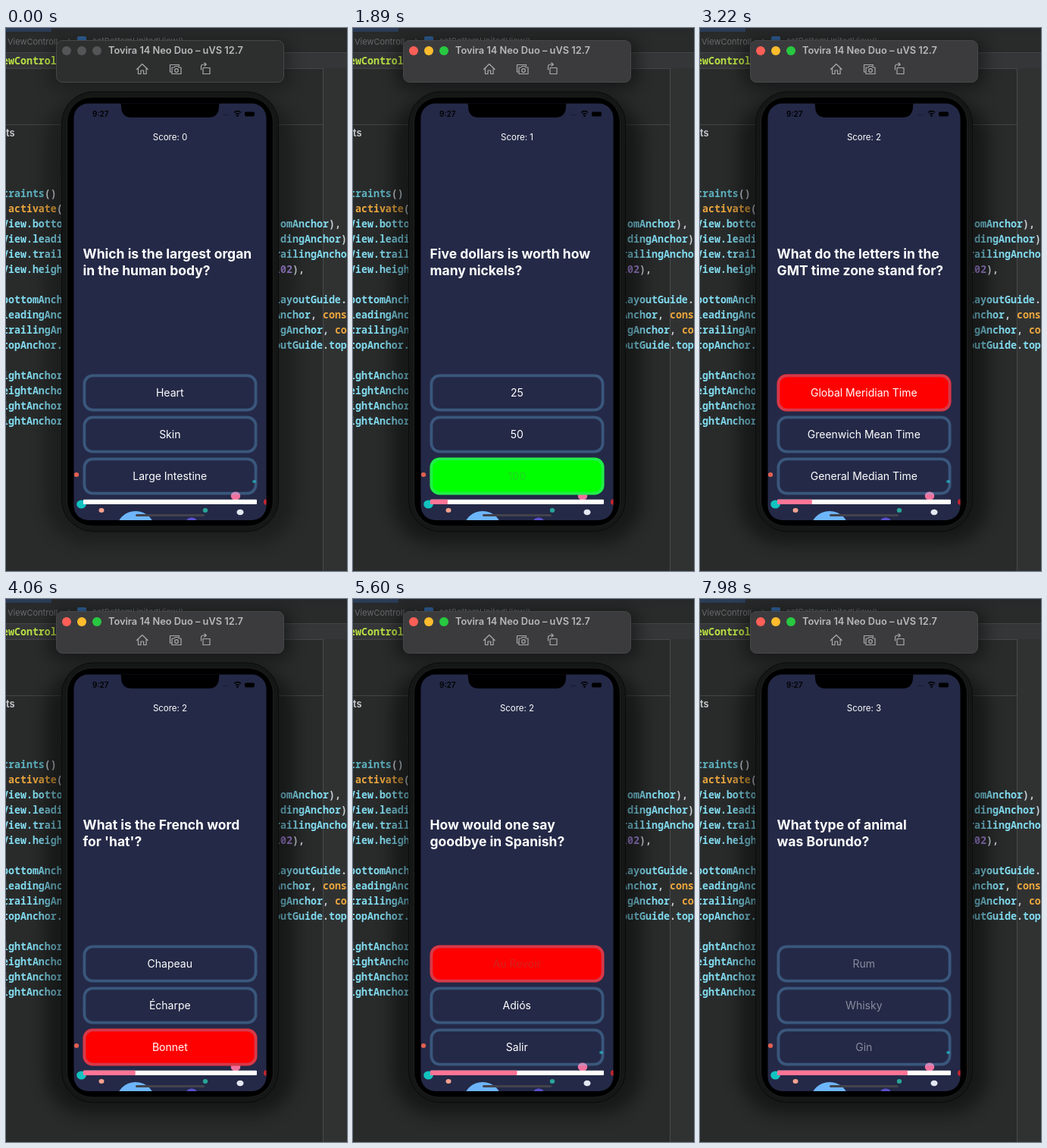
These frames come from a looping animation (450x716 px, 8 s). An HTML page:

```html
<!DOCTYPE html>
<html lang="en">
<head>
<meta charset="utf-8">
<title>Quiz app</title>
<style>
  html, body { margin: 0; height: 100%; overflow: hidden; background: #292b2c; }
  svg { display: block; width: 100vw; height: 100vh; font-family: Inter, Roboto, sans-serif; }
  #code { font: 600 13.3px "Noto Sans Mono", "DejaVu Sans Mono", monospace; fill: #82dcf0; }
  .teal { fill: #5fb3c2; }
  .orange { fill: #eba63d; }
  .purple { fill: #ab8ce4; }
  .lime { fill: #b9e044; }
  .plain { fill: #c8d2d8; }
  #question { font-weight: 700; font-size: 17.5px; fill: #fff; }
  #buttons text { font-size: 14px; text-anchor: middle; }
  #icons { fill: none; stroke: #a9a9ab; stroke-width: 1.2; stroke-linejoin: round; stroke-linecap: round; }
</style>
</head>
<body>
<svg viewBox="0 0 450 716">
  <defs>
    <filter id="blur" x="-30%" y="-50%" width="160%" height="200%"><feGaussianBlur stdDeviation="11"/></filter>
    <clipPath id="screen"><rect x="89.500" y="99.500" width="254" height="549.500" rx="19"/></clipPath>
  </defs>

  <!-- editor -->
  <rect width="450" height="716" fill="#292b2b"/>
  <rect width="450" height="8" fill="#28292b"/>
  <rect width="60" height="5" fill="#2b3c57"/>
  <rect y="33" width="450" height="20" fill="#343637"/>
  <path d="M0 32.5H450M0 53.5H450M0 127.5H418" stroke="#434546"/>
  <rect x="418" y="53" width="32" height="663" fill="#303232"/>
  <path d="M418.500 53V716" stroke="#484a4b"/>
  <g font-size="11" fill="#67696b">
    <text x="2" y="22">ViewControll</text>
    <path d="M82 14l4 4l-4 4" fill="none" stroke="#67696b"/>
    <rect x="94" y="11" width="12" height="12" rx="2" fill="#2f5f96"/>
    <text x="114" y="21">setBottomUnitedView()</text>
  </g>
  <text y="143" font-size="13" font-weight="600" fill="#c9cdd0">ts</text>
  <g id="code"></g>

  <!-- phone -->
  <g id="shadow" filter="url(#blur)">
    <rect x="52" y="92" width="329" height="588" rx="55"/>
    <rect x="58" y="16" width="317" height="64" rx="12"/>
  </g>
  <rect x="71" y="175" width="4" height="18" fill="#191a1a"/>
  <rect x="73.500" y="84" width="286" height="580" rx="42" fill="#151616" stroke="#0b0b0b"/>
  <rect x="80.500" y="91" width="272" height="566" rx="33" stroke="#1f2020"/>
  <g clip-path="url(#screen)">
    <rect x="89" y="99" width="255" height="550" fill="#242947"/>
    <g id="bubbles"></g>
    <g id="buttons"></g>
    <rect x="102" y="621.800" width="229" height="6.300" rx="1" fill="#fffefa"/>
    <rect id="bar" x="102" y="621.800" height="6.300" rx="1" fill="#ff7496"/>
    <rect x="171" y="641" width="91" height="3" rx="1.500" fill="#43434b"/>
    <text id="score" x="216.500" y="147.600" font-size="11.500" fill="#fff" text-anchor="middle"></text>
    <g id="question"></g>
    <text x="114" y="117" font-size="10" font-weight="600">9:27</text>
    <path d="M287 114.500h8" stroke="#171a30" stroke-width="1.500" stroke-dasharray="1.500 1"/>
    <path d="M301 111.500q4.500-4 9 0M303 113.700q2.500-2 5 0" fill="none" stroke="#000" stroke-width="1.500"/>
    <circle cx="305.500" cy="115.800" r="1.300"/>
    <rect x="315" y="110.500" width="13" height="6" rx="1.800"/>
    <path d="M148 98q4 0 4 5q0 15 14 15h101q14 0 14-15q0-5 4-5z"/>
  </g>

  <!-- window bar -->
  <rect id="panel" x="66.500" y="16.500" width="300" height="55" rx="8" stroke="#474749"/>
  <g id="lights"></g>
  <text x="135" y="34.300" font-size="12.800" font-weight="600" fill="#b9b9bb">Tovira 14 Neo Duo – uVS 12.7</text>
  <g id="icons">
    <path d="M172.500 54.500l7.300-7l7.300 7M174.500 53v7.500h3.500v-4.500h3.600v4.500h3.500v-7.500"/>
    <path d="M218 58h-1.500v-9.500h12v1.500M219 52h3l1-1.500h4l1 1.500h3v8.500h-12z"/>
    <circle cx="225" cy="56" r="2.300"/>
    <path d="M260 52.500h9v8h-9zM257.500 55v-4q0-3 3-3h3.500M262 46l2.300 2l-2.300 2"/>
  </g>
</svg>
<script>
const LOOP = 8000, FOCUS = 630;
const REVEAL = 300;              // tap to next question
const OUT = 170, IN = 120, SLIDE = 180;

// tap time, tapped option, correct?, question lines, options
const quiz = [
  [890, 1, 1, 'Which is the largest organ|in the human body?', 'Heart|Skin|Large Intestine'],
  [1810, 2, 1, 'Five dollars is worth how|many nickels?', '25|50|100'],
  [2960, 0, 0, 'What do the letters in the|GMT time zone stand for?', 'Global Meridian Time|Greenwich Mean Time|General Median Time'],
  [3780, 2, 0, "What is the French word|for 'hat'?", 'Chapeau|Écharpe|Bonnet'],
  [4670, 1, 0, 'In past times, what would|a gentleman keep in his|fob pocket?', 'Notebook|Handkerchief|Watch'],
  [5530, 0, 0, 'How would one say|goodbye in Spanish?', 'Au Revoir|Adiós|Salir'],
  [6600, 2, 0, 'Which of these colours is|NOT featured in the logo|for Zovika?', 'Green|Orange|Blue'],
  [7590, 0, 1, 'What alcoholic drink is|made from molasses?', 'Rum|Whisky|Gin'],
  [1e9, 0, 0, 'What type of animal|was Borundo?', 'Panda|Gorilla|Crocodile'],
].map(([tap, pick, right, ask, options]) =>
  ({ tap, pick, right, ask: ask.split('|'), options: options.split('|') }));

const $ = id => document.getElementById(id);
const clamp = v => Math.max(0, Math.min(1, v));

function add(parent, tag, attrs, text = '') {
  const el = document.createElementNS('http://www.w3.org/2000/svg', tag);
  for (const key in attrs) el.setAttribute(key, attrs[key]);
  el.textContent = text;
  parent.append(el);
  return el;
}

// Code: column, row and text; a class may prefix a coloured run
const code = [
  [0, -8.75, 'lime:ewController'],
  [0, 0, 'teal:traints', 'plain:()'], [0, 1, 'plain:.', 'orange:activate', 'plain:(['],
  [0, 2, 'View.botto'], [0, 3, 'View.leadi'], [0, 4, 'View.trail'], [0, 5, 'View.heigh'],
  [0, 7, 'bottomAnch'], [0, 8, 'leadingAnc'], [0, 9, 'trailingAn'], [0, 10, 'topAnchor.'],
  [0, 12, 'ightAnchor'], [0, 13, 'eightAncho'], [0, 14, 'ightAnchor'], [0, 15, 'ightAnchor'],
  [46, 2, 'omAnchor', 'plain:),'], [46, 3, 'dingAnchor', 'plain:),'], [45, 4, 'railingAnchor'],
  [45, 5, 'purple:102', 'plain:),'], [45, 7, 'LayoutGuide', 'plain:.'],
  [45, 8, 'Anchor', 'plain:,', ' ', 'orange:const'], [46, 9, 'gAnchor', 'plain:,', ' ', 'orange:const'],
  [45, 10, 'outGuide', 'plain:.', 'topAnchor'],
];
for (let [col, row, ...runs] of code)
  for (const run of runs) {
    const [text, cls = ''] = run.split(':').reverse();
    add($('code'), 'text', { x: col * 7.98 - 5, y: 223 + row * 20, class: cls }, text);
    col += text.length;
  }

for (const [cx, cy, rx, ry, fill] of [
  [93, 589, 3.2, 3, '#e0604f'], [303, 617, 6.3, 5.5, '#f0719d'], [327.5, 598, 2.5, 2, '#1b93a0'],
  [343.5, 625, 3.5, 3.8, '#c9252f'], [99.5, 628, 6.3, 5.5, '#12c3c0'], [126, 636, 3.5, 3, '#f6a08e'],
  [263, 636, 3.2, 3, '#28a596'], [309, 638.5, 4.5, 3.8, '#e4e8f2'],
  [171, 661, 25, 24, '#6db5fb'], [245, 651, 7, 5.5, '#5b50cd'],
]) add($('bubbles'), 'ellipse', { cx, cy, rx, ry, fill });

const buttons = [0, 1, 2].map(i => {
  const y = 456.5 + i * 55, g = $('buttons');
  return {
    fill: add(g, 'rect', { x: 101.5, y, width: 230, height: 49, rx: 12.5 }),
    edge: add(g, 'rect', { x: 103.4, y: y + 1.9, width: 226.2, height: 45.2, rx: 11, fill: 'none',
      stroke: 'rgba(112,200,255,.29)', 'stroke-width': 3.8 }),
    label: add(g, 'text', { x: 216.3, y: y + 29.8 }),
  };
});

const lights = ['#ff5f57', '#febc2e', '#28c840'].map((color, i) =>
  ({ color, el: add($('lights'), 'circle', { cx: 80 + i * 20, cy: 30, r: 6 }) }));

let shown = -1;
function showQuestion(n) {
  if (n === shown) return;
  shown = n;
  const { ask } = quiz[n];
  $('question').replaceChildren();
  ask.forEach((line, i) =>
    add($('question'), 'text', { x: 101.5, y: 325.6 + i * 22 - ask.length * 11 }, line));
  const score = quiz.slice(0, n).reduce((sum, q) => sum + q.right, 0);
  $('score').textContent = 'Score: ' + score;
}

function draw(t) {
  const n = quiz.findIndex(q => t < q.tap + REVEAL);
  const { tap, pick, right } = quiz[n];
  const age = n ? t - quiz[n - 1].tap - REVEAL : 1e9;
  const leaving = age < OUT;
  const fade = leaving ? 1 - age / OUT : clamp((age - OUT) / IN);
  const options = quiz[leaving ? n - 1 : n].options;

  showQuestion(n);
  $('bar').setAttribute('width', 22.9 * (n && n - 1 + clamp(age / SLIDE)));

  buttons.forEach(({ fill, label }, i) => {
    const tapped = i === pick && t >= tap;
    // a tapped title dims, then recovers
    const glow = tapped ? clamp((t - tap - 80) / 150) : 1;
    const grey = 110 + 145 * glow;
    fill.setAttribute('fill', !tapped ? 'none' : right ? '#00ff00' : '#ff0000');
    label.textContent = options[i];
    label.setAttribute('fill', `rgba(${grey},${grey},${grey},${fade * (.3 + .7 * glow)})`);
  });

  const active = t >= FOCUS;
  for (const { el, color } of lights) el.setAttribute('fill', active ? color : '#545556');
  $('panel').setAttribute('fill', active ? '#3b3b3d' : '#2d2e2e');
  $('shadow').setAttribute('opacity', active ? .45 : .3);
}

const start = performance.now();
function tick() {
  draw((performance.now() - start) % LOOP);
  requestAnimationFrame(tick);
}
tick();
</script>
</body>
</html>
```
